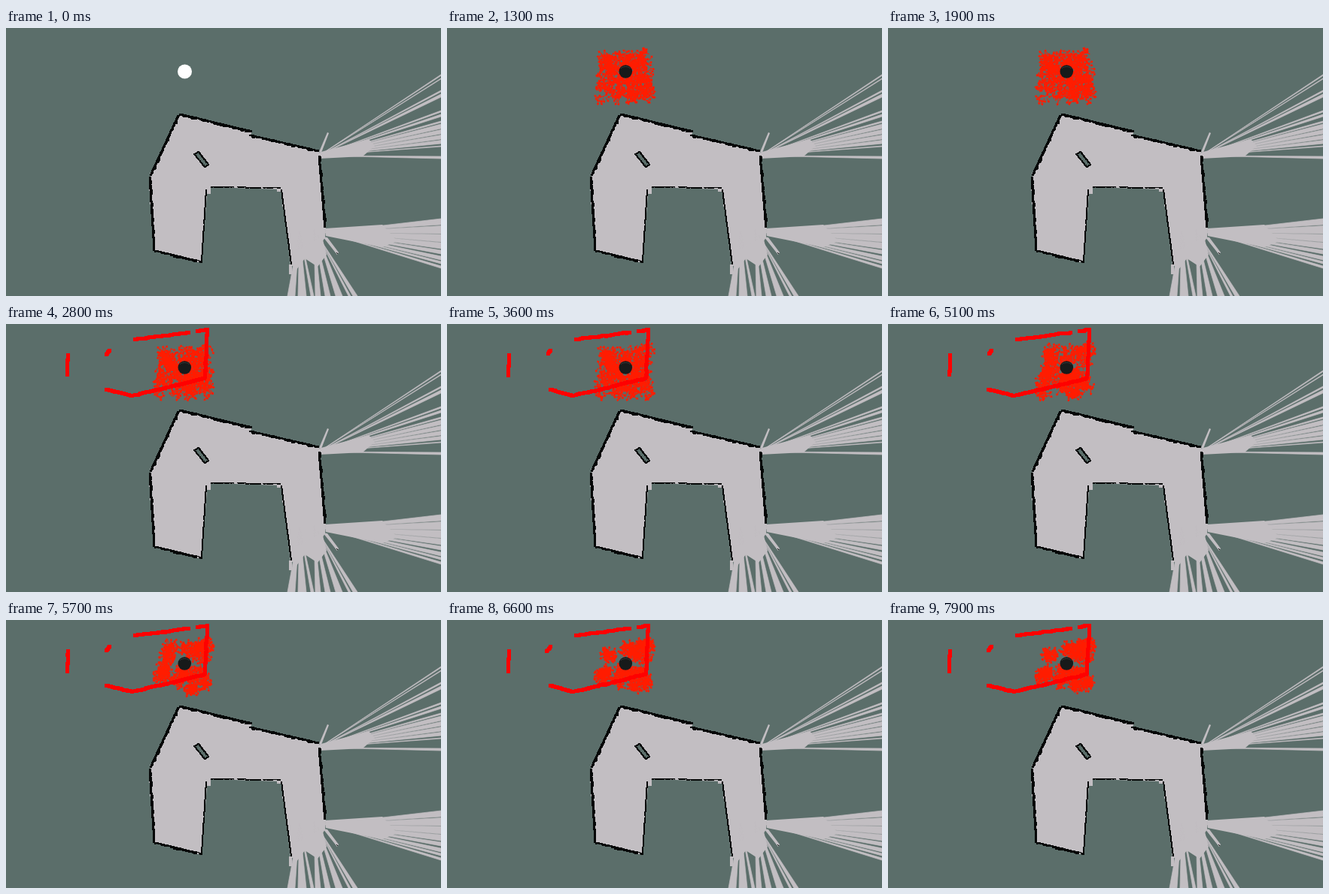
Write an HTML page with a canvas that moves like this. It is 578x357 px and loops after 8 s.

```html
<!DOCTYPE html>
<html lang="en">
<head>
<meta charset="utf-8">
<title>Robot localisation</title>
<style>
  html, body { margin: 0; width: 100%; height: 100%; overflow: hidden; background: #5b6e6a; }
  canvas { display: block; width: 578px; height: 357px; }
</style>
</head>
<body>
<canvas id="stage" width="578" height="357"></canvas>
<script>
const W = 578, H = 357, LOOP = 8000, STEP = 100;
const BACK = '#5b6e6a', FREE = '#c2bec2', WALL = '#050707', CLOUD = '#ff1c00', SCAN = '#ff0000';
const ctx = document.getElementById('stage').getContext('2d');

// repeatable noise in 0..1
function rnd(a, b = 0) {
  let h = Math.imul(a + 1, 374761393) ^ Math.imul(b + 7, 668265263);
  h = Math.imul(h ^ (h >>> 13), 1274126177);
  h = Math.imul(h ^ (h >>> 16), 2246822519);
  return ((h ^ (h >>> 15)) >>> 0) / 4294967296;
}

function poly(g, pts, fill) {
  g.beginPath();
  for (let i = 0; i < pts.length; i += 2) g.lineTo(pts[i], pts[i + 1]);
  g.closePath();
  g.fillStyle = fill;
  g.fill();
}

// thin wedges from one point to pairs of places on the stage edge
function fan(g, x, y, ends, down) {
  g.strokeStyle = FREE;
  g.lineWidth = 0.7;
  for (let i = 0; i < ends.length; i += 2) {
    const [a, b] = [ends[i], ends[i + 1]];
    poly(g, down ? [x, y, a, H, b, H] : [x, y, W, a, W, b], FREE);
    g.stroke();
  }
}

// rough wall of small squares
function wall(g, x0, y0, x1, y1, size = 3) {
  const n = Math.hypot(x1 - x0, y1 - y0);
  for (let i = 0; i <= n; i++) {
    const x = x0 + (x1 - x0) * i / n, y = y0 + (y1 - y0) * i / n;
    const k = Math.round(x0 * 3 + y0);
    const j = rnd(i >> 1, k);
    const s = j > 0.8 && size > 2 ? size + 1 : size;
    if (j < 0.04) {
      g.fillStyle = FREE;
      g.fillRect(Math.round(x) - 2, Math.round(y) - 1, 2, 2);
    }
    g.fillStyle = WALL;
    g.fillRect(Math.round(x - size / 2), Math.round(y - size / 2), s, s - (j < 0.3 ? 1 : 0));
  }
}

function makeMap() {
  const map = document.createElement('canvas');
  map.width = W;
  map.height = H;
  const g = map.getContext('2d');
  g.fillStyle = BACK;
  g.fillRect(0, 0, W, H);

  poly(g, [231, 115, 327, 138, 324, 144, 416, 165, 425, 268, 424, 279, 415, 293, 383, 318,
    378, 316, 366, 215, 272, 212, 267, 221, 260, 312, 198, 297, 191, 199], FREE);
  fan(g, 416, 170, [62, 63.5, 67, 68, 83, 85, 88, 92, 110, 112, 115, 118, 124, 126, 128, 134,
    135.5, 141, 142.5, 148, 149.5, 154, 157, 158, 171, 174]);
  poly(g, [415, 166, 482, 148, 490, 157, 474, 171, 416, 174], FREE);
  fan(g, 424, 272, [254, 262, 263.5, 274, 275, 285, 286, 294, 296, 301, 304, 309, 311, 314, 317, 320]);
  poly(g, [424, 267, 500, 262, 520, 284, 500, 292, 425, 277], FREE);
  fan(g, 390, 270, [374, 384, 388, 399, 405, 409], true);
  fan(g, 409, 268, [411, 418, 424, 431], true);
  fan(g, 414, 276, [438, 447, 455, 458, 461, 467], true);
  poly(g, [380, 300, 420, 278, 426, 302, 414, 318, 397, 307, 386, 322], FREE);
  poly(g, [421, 278, 427, 279, 442, 299, 440, 302], FREE);
  poly(g, [416, 165, 427, 139, 429, 140, 419, 166], FREE);
  g.fillStyle = FREE;
  g.fillRect(264, 213, 8, 8);
  g.fillRect(360, 213, 6, 5);
  g.fillRect(376, 315, 4, 13);

  wall(g, 231, 115, 326, 138);
  wall(g, 324, 143, 415, 164);
  wall(g, 416, 171, 424, 266);
  wall(g, 229, 117, 192, 197);
  wall(g, 191, 199, 197, 296);
  wall(g, 198, 297, 260, 312);
  wall(g, 260, 310, 266, 216, 2);
  wall(g, 273, 212, 364, 213, 2);
  wall(g, 366, 216, 379, 315, 2);
  wall(g, 439, 299, 441, 301, 1);
  const box = [256, 165, 269, 182, 264, 185, 250, 168];
  poly(g, box, BACK);
  for (let i = 0; i < 8; i += 2) wall(g, box[i], box[i + 1], box[(i + 2) % 8], box[(i + 3) % 8], 2);
  return map;
}

const map = makeMap();
const holds = [16, 25, 31, 33, 35, 43, 47, 55, 63, 67, 68];
const COUNT = 900, GROUPS = 160;

// guesses that survive every resampling
const kept = [[212, 71], [264, 83], [255, 35], [249, 44], [232, 67], [214, 47], [229, 80], [262, 48],
  [245, 73], [206, 74], [258, 70], [266, 34], [239, 39], [252, 87]];
const survivors = [[13, 160], [20, 145], [28, 95], [44, 42], [57, 19], [66, 14], [80, 14]];

function groupCount(s) {
  for (let i = 1; i < survivors.length; i++) {
    const [a, m] = survivors[i - 1], [b, n] = survivors[i];
    if (s <= b) return Math.round(m + (n - m) * (s - a) / (b - a));
  }
  return kept.length;
}

function centre(c) {
  return kept[c] || [205 + rnd(c, 11) * 65, 36 + rnd(c, 12) * 58];
}

function drawCloud(s) {
  const k = groupCount(s);
  ctx.beginPath();
  for (let i = 0; i < COUNT; i++) {
    let c = i % GROUPS;
    while (c >= k) c = Math.floor(c * rnd(i, c));
    const [cx, cy] = centre(c);
    const turn = rnd(i, 1) * 6.283 + (s - 13) * 0.06 * (rnd(c, 5) - 0.5);
    const r = 9 * Math.sqrt(rnd(i, 2)) * (0.6 + 0.4 * rnd(i, 3));
    const x = Math.min(273, Math.max(201, cx + r * Math.cos(turn)));
    const y = Math.min(97, Math.max(28, cy + r * Math.sin(turn)));
    const dir = rnd(i, 4) * 6.283 + (rnd(i, s) - 0.5) * 0.3;
    const tx = Math.min(277, x + 6 * Math.cos(dir)), ty = y + 6 * Math.sin(dir);
    ctx.moveTo(x, y);
    ctx.lineTo(tx, ty);
    ctx.moveTo(tx + 2.5 * Math.cos(dir + 2.5), ty + 2.5 * Math.sin(dir + 2.5));
    ctx.lineTo(tx, ty);
    ctx.lineTo(tx + 2.5 * Math.cos(dir - 2.5), ty + 2.5 * Math.sin(dir - 2.5));
  }
  ctx.strokeStyle = CLOUD;
  ctx.lineWidth = 1.1;
  ctx.stroke();
}

function scanLine(x0, y0, x1, y1, s) {
  const n = Math.ceil(Math.hypot(x1 - x0, y1 - y0) / 2);
  for (let i = 0; i <= n; i++) {
    const x = x0 + (x1 - x0) * i / n, y = y0 + (y1 - y0) * i / n;
    const j = (rnd(i >> 2, s + x0) - 0.5) * 0.8;
    ctx.fillRect(Math.round(x + j) - 2, Math.round(y + j) - 2, 5, 5);
  }
}

function drawScan(s) {
  const shift = n => Math.floor(rnd(s, n) * 3);
  ctx.fillStyle = SCAN;
  scanLine(82, 41, 81, 67 + shift(21), s);
  const small = shift(22);
  scanLine(132 + small, 41 - small, 137, 35, s);
  scanLine(171, 20, 220, 14, s);
  scanLine(223, 13, 242, 11, s);
  scanLine(254, 9, 267, 7, s);
  scanLine(267, 8, 264, 70, s);
  scanLine(263, 72, 219, 83, s);
  scanLine(215, 84, 171, 94, s);
  scanLine(167, 95, 133 + 2 * shift(23), 87, s);
}

function disc(x, y, r, fill) {
  ctx.beginPath();
  ctx.arc(x, y, r, 0, Math.PI * 2);
  ctx.fillStyle = fill;
  ctx.fill();
}

function drawRobot(on) {
  if (!on) return disc(237.5, 58, 9.5, '#ffffff');
  disc(237.3, 58, 8.8, '#171a1a');
  ctx.beginPath();
  ctx.ellipse(237.3, 54, 6, 2.5, 0, Math.PI, Math.PI * 2);
  ctx.strokeStyle = '#353939';
  ctx.lineWidth = 1;
  ctx.stroke();
}

let last = -1;
function draw() {
  let s = Math.floor(performance.now() % LOOP / STEP);
  while (holds.includes(s)) s--;
  if (s < 13) s = 0;
  if (s !== last) {
    last = s;
    ctx.drawImage(map, 0, 0);
    if (s) drawCloud(s);
    if (s >= 20) drawScan(s);
    drawRobot(s > 0);
  }
  requestAnimationFrame(draw);
}
draw();
</script>
</body>
</html>
```
